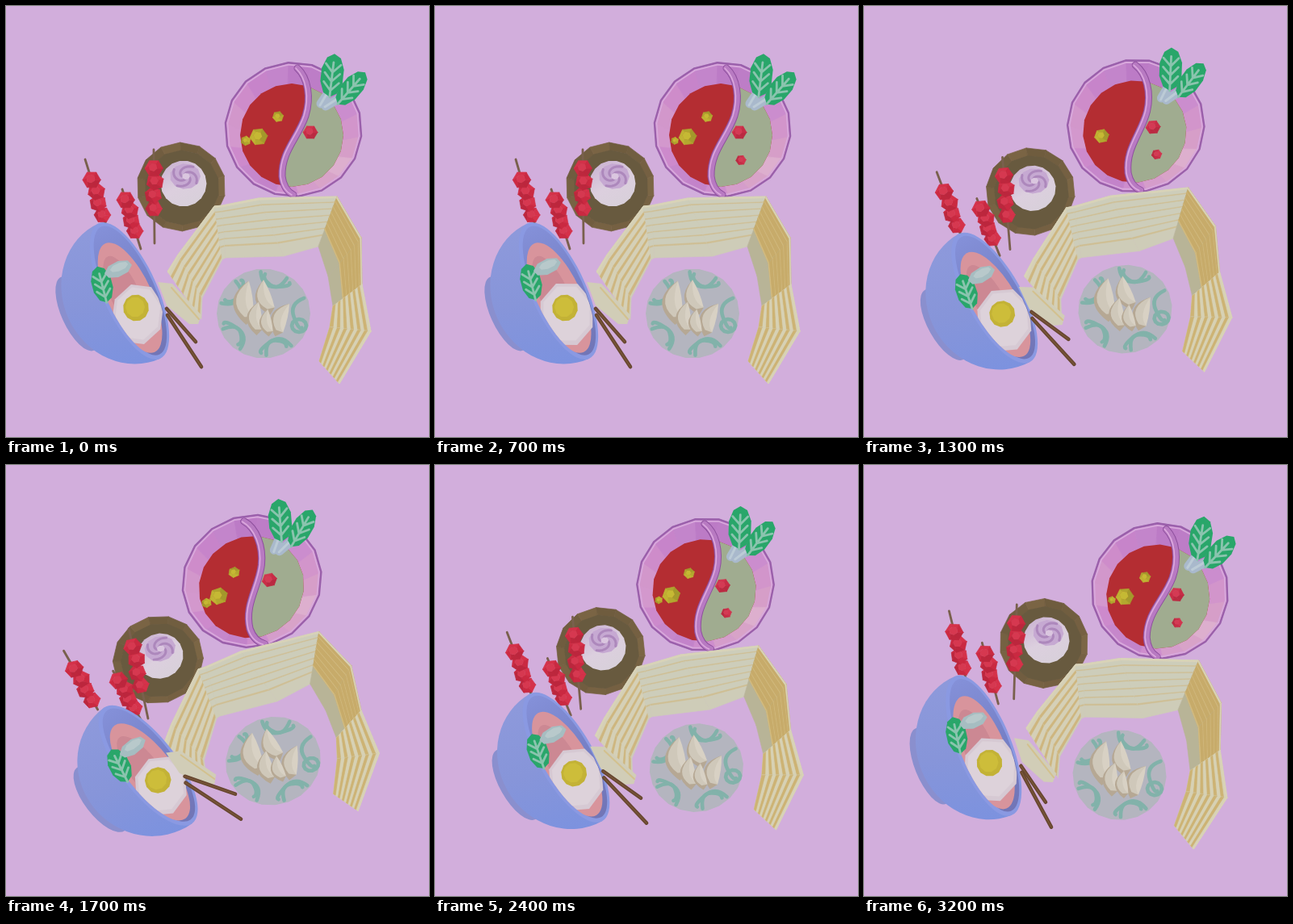
An HTML page with a canvas that plays this animation: 524x534 px, repeating every 3300 ms.

```html
<!DOCTYPE html>
<html lang="en">
<head>
<meta charset="utf-8">
<title>Street food table</title>
<style>
html, body { margin: 0; width: 100%; height: 100%; overflow: hidden; background: #d2aedc; }
canvas { display: block; width: 524px; height: 534px; }
</style>
</head>
<body>
<canvas id="stage" width="524" height="534"></canvas>
<script>
const ctx = document.getElementById('stage').getContext('2d');
const LOOP = 3300, STEP = 100, TAU = 2 * Math.PI;

const mix = (a, b, k) => a + (b - a) * k;
const clamp = v => Math.min(1, Math.max(0, v));
const ease = u => u * u * (3 - 2 * u);
const rand = seed => Math.abs(Math.sin(seed * 12.9898) * 43758.5453) % 1;
const hsl = (h, s, l) => `hsl(${h} ${s}% ${l}%)`;

// The table rests, swings round, then drifts back past its rest.
function swingAt(t) {
  if (t < 1800) return 1.03 * ease(clamp((t - 700) / 1100) ** 1.5);
  return mix(1.03, -0.2, ease(((t - 1800) / 1400) ** 0.8));
}

// Food surfaces and sinks again.
const bobAt = t => Math.min(1, 2.8 * Math.sin(Math.PI * (t % 1700) / 1700));
const floatAt = t => 1 - Math.exp(-(((t - 1300) / 150) ** 2));

function stroke(d, color, width) {
  ctx.strokeStyle = color;
  ctx.lineWidth = width;
  ctx.stroke(new Path2D(d));
}

function fill(d, color) {
  ctx.fillStyle = color;
  ctx.fill(new Path2D(d));
}

function ramp(x0, y0, x1, y1, ...colors) {
  const g = ctx.createLinearGradient(x0, y0, x1, y1);
  colors.forEach((c, i) => g.addColorStop(i / (colors.length - 1), c));
  return g;
}

function trace(points) {
  ctx.beginPath();
  points.forEach(p => ctx.lineTo(...p));
  ctx.closePath();
}

function ring(x, y, rx, ry, n, turn = 0) {
  return Array.from({ length: n }, (_, i) => {
    const a = turn + i * TAU / n;
    return [x + rx * Math.cos(a), y + ry * Math.sin(a)];
  });
}

function ngon(x, y, rx, ry, n, turn, color) {
  trace(ring(x, y, rx, ry, n, turn));
  ctx.fillStyle = color;
  ctx.fill();
}

function outline(x, y, rx, ry, n, turn, color, width) {
  trace(ring(x, y, rx, ry, n, turn));
  ctx.strokeStyle = color;
  ctx.lineWidth = width;
  ctx.stroke();
}

function oval(x, y, rx, ry, color, from = 0, to = TAU) {
  ctx.beginPath();
  ctx.ellipse(x, y, rx, ry, 0, from, to);
  ctx.fillStyle = color;
  ctx.fill();
}

// Flat panels between two rings, coloured by their angle.
function panels(outer, inner, tint) {
  const n = outer.length;
  outer.forEach((p, i) => {
    const j = (i + 1) % n;
    trace([p, outer[j], inner[j], inner[i]]);
    ctx.fillStyle = ctx.strokeStyle = tint((i + 0.5) * TAU / n, i);
    ctx.lineWidth = 0.7;
    ctx.fill();
    ctx.stroke();
  });
}

function gem(x, y, r, hue, sat, light, seed = x) {
  if (r < 0.4) return;
  const edge = ring(x, y, r, r * 0.97, 6, seed);
  const core = ring(x - r * 0.1, y - r * 0.12, r * 0.5, r * 0.48, 6, seed + 0.3);
  panels(edge, core, a => hsl(hue, sat, light - 4 * Math.sin(a + 0.6)));
  trace(core);
  ctx.fillStyle = hsl(hue, sat, light + 5);
  ctx.fill();
}

// Tilts the table by r; nearer things slide further.
function place(r, depth, lift, draw) {
  ctx.save();
  ctx.transform(1, -0.235 * r, 0.2 * r, 1 - 0.04 * r, (depth - 70) * r, 75.6 * r + lift * r * r);
  draw();
  ctx.restore();
}

function local(x, y, turn, draw) {
  ctx.save();
  ctx.translate(x, y);
  ctx.rotate(turn);
  draw();
  ctx.restore();
}

function leaf(x, y, rx, ry, turn) {
  local(x, y, turn, () => {
    ngon(0, 0, rx, ry, 10, 0.3, '#29a66a');
    let d = `M0 ${ry}V${-ry * 0.6}`;
    for (let y = ry * 0.7; y > -ry * 0.5; y -= ry * 0.42) {
      d += `M${-rx * 0.65} ${y - ry * 0.38}L0 ${y}L${rx * 0.65} ${y - ry * 0.38}`;
    }
    stroke(d, '#8ac4ae', 2.8);
  });
}

function hotPot(bob, float) {
  const x = 356, y = 153, n = 18;
  const rim = ring(x, y, 85, 83.5, n, 0.1);
  panels(rim, ring(354, 160, 62, 62, n, 0.1), (a, i) => {
    const glow = Math.max(0, Math.cos(a - 0.6)) ** 2 + 0.55 * Math.max(0, Math.cos(a - 3.2)) ** 3;
    return hsl(mix(292, 320, glow), 40, 63 + 12 * glow + 3 * rand(i));
  });
  outline(x, y, 84.5, 83, n, 0.1, '#9a60ab', 2.4);
  outline(x, y, 82, 80.5, n, 0.1, '#d8a8dc', 1.8);

  const wall = 'M361 77C374 89 378 113 371 136C362 163 341 180 342 211Q344 228 356 234';
  ctx.save();
  trace(ring(354, 160, 64, 64, 20));
  ctx.clip();
  ctx.fillStyle = '#b42d32';
  ctx.fillRect(280, 80, 150, 160);
  fill(wall + 'H440V77Z', '#a0ac90');
  ctx.restore();
  stroke(wall, '#8e509e', 9);
  stroke(wall, '#b87ac2', 7);
  ctx.save();
  ctx.translate(-2, 0);
  stroke(wall, '#dca8de', 1.6);
  ctx.restore();

  gem(337, 137, 6.8 * float, 55, 58, 44);
  gem(313, 162, mix(9, 11, float), 55, 58, 44);
  gem(297, 167, mix(6, 4.6, bob) * float, 55, 58, 44);
  gem(377, 156.5, 9, 350, 64, 48);
  gem(379, 191, 6.3 * bob, 350, 64, 48);

  stroke('M390 121L399 108M396 124L412 115', '#a9b9cc', 11);
  stroke('M389 123L399 106M395 125L412 114', '#bccbd6', 3);
  leaf(404, 86, 14.5, 27, 0.12);
  leaf(428, 102, 13, 26, 0.72);
}

function brownBowl() {
  const x = 217, y = 224, n = 14;
  panels(ring(x, y, 55, 55, n, 0.2), ring(x + 1, y + 1, 46, 46, n, 0.2),
    (a, i) => hsl(36, 28, 34 + 4 * rand(i + 3)));
  ngon(x + 1, y + 1, 46.5, 46.5, n, 0.2, '#685a3f');
  ngon(220, 220, 28.5, 28.5, 18, 0, ramp(204, 196, 232, 248, '#cdb6d4', '#dccfde', '#d8d0da'));
  ngon(222, 211, 19, 16, 11, 0, '#c6a9d2');
  for (let k = 0; k < 4; k++) {
    ctx.beginPath();
    for (let s = 0; s <= 1; s += 0.1) {
      const a = k * TAU / 4 + 2.2 * s, d = mix(4, 17, s);
      ctx.lineTo(222 + d * Math.cos(a), 211 + d * 0.85 * Math.sin(a));
    }
    ctx.strokeStyle = '#ad88bc';
    ctx.lineWidth = 3;
    ctx.stroke();
  }
  ngon(223, 211, 5, 4, 7, 0, '#dac6df');
}

function skewer(x0, y0, x1, y1, from, to) {
  stroke(`M${x0} ${y0}L${x1} ${y1}`, '#79604d', 2.8);
  for (let i = 3; i >= 0; i--) {
    const k = mix(from, to, i / 3);
    gem(mix(x0, x1, k) + 1.5 * Math.sin(i * 2), mix(y0, y1, k), 11.2 - 0.3 * i, 351, 66, 48, i * 0.7);
  }
}

const OUTER = [[200, 329], [213, 308], [258, 248], [268, 247], [313, 238],
  [410, 236], [440, 287], [441, 345], [452, 403], [413, 468]];
const INNER = [[242, 388], [243, 362], [268, 314], [272, 312], [344, 310],
  [387, 298], [399, 335], [405, 372], [401, 398], [388, 440]];
const LEG = { depth: 0.95, base: '#d5d0b7', stripe: '#ceb67f', part: 0.36 };
const TOP = { depth: 0.78, base: '#cdcdba', stripe: '#cfbe93', part: 0.16 };
const GOLD = { depth: 0.66, base: '#c7ab6a', stripe: '#d3bd84', part: 0.13 };
const TAIL = { depth: 1, base: '#d7d1b4', stripe: '#cdb374', part: 0.48 };

function noodles() {
  const at = (i, f) => [mix(OUTER[i][0], INNER[i][0], f), mix(OUTER[i][1], INNER[i][1], f)];
  const band = (i, a, b, color) => {
    trace([at(i, a), at(i + 1, a), at(i + 1, b), at(i, b)]);
    ctx.fillStyle = ctx.strokeStyle = color;
    ctx.lineWidth = 0.6;
    ctx.fill();
    ctx.stroke();
  };
  for (let i = 0; i < OUTER.length - 1; i++) {
    const look = i < 2 ? LEG : i < 5 ? TOP : i < 7 ? GOLD : TAIL;
    band(i, 0, 1, look === GOLD ? '#b8b497' : '#ceccb8');
    for (let k = 0; k < 6; k++) {
      const a = k / 6 * look.depth, b = (k + 1) / 6 * look.depth;
      band(i, a, b, look.base);
      band(i, mix(b, a, look.part), b, look.stripe);
    }
    band(i, 0, 0.03, '#d9d3b8');
  }
}

function noodleEnd() {
  trace([[188, 342], [206, 344], [242, 383], [238, 394], [227, 394], [199, 371]]);
  ctx.fillStyle = '#d1cdb7';
  ctx.fill();
  stroke('M205 349L239 388', '#d3c18e', 2);
}

function plate() {
  const x = 319, y = 381;
  ngon(x, y, 58, 55.5, 22, 0, '#b4b5bf');
  const polar = (d, a) => `${x + d * Math.cos(a)} ${y + d * 0.96 * Math.sin(a)}`;
  for (let k = 1; k < 10; k++) {
    const a = k * TAU / 10 + 0.25, bend = k % 2 ? 0.5 : -0.35;
    stroke(`M${polar(54, a)}Q${polar(34, a)} ${polar(38, a + bend)}T${polar(51, a + bend * 1.5)}`, '#82b2aa', 4.6);
  }
  outline(363, 396, 9, 8, 12, 0, '#82b2aa', 4.6);
  const dumpling = (px, py, size, turn) => local(px, py, turn, () => {
    ctx.scale(size, size);
    fill('M5 -25Q-28 2 7 27L15 17Q1 4 5 -25Z', '#b6a894');
    fill('M5 -25Q-20 0 4 18L15 17Q1 4 5 -25Z', '#cfc8ba');
    fill('M5 -25Q-2 6 15 17Q13 -6 5 -25Z', '#d8d1c4');
  });
  dumpling(293, 366, 1.05, 0.1);
  dumpling(318, 361, 0.85, -0.15);
  dumpling(307, 386, 0.8, 0.1);
  dumpling(338, 386, 0.85, 0.45);
  dumpling(321, 392, 0.65, 0);
}

function blueBowl(bob) {
  const turn = 1.143;
  const inBowl = draw => local(153, 353, turn, draw);
  inBowl(() => {
    oval(-1, 70, 50, 20, '#8a8fce');
    oval(0, 0, 92, 83, ramp(-80, 0, 85, 40, '#8d99db', '#8795d9', '#7c92df'), 0, Math.PI);
    oval(0, 0, 92, 34, '#8a99e2');
    oval(0, -1, 87, 30, ramp(-85, 0, 85, 0, '#8490d8', '#7680c6', '#7275b6'));
  });
  ctx.save();
  ctx.beginPath();
  ctx.ellipse(153, 353, 87, 30, turn, 0, TAU);
  ctx.clip();
  inBowl(() => {
    oval(8, 3, 74, 28, '#d8949c');
    oval(2, 7, 52, 18, '#cc8893');
  });
  const size = mix(0.94, 1, bob);
  local(163, 382, mix(0.12, 0, bob), () => {
    ngon(0, 0, 35 * size, 41 * size, 8, 0.4, '#d6c9d3');
    ngon(0, -1, 31 * size, 36 * size, 8, 0.4, '#ddd2da');
  });
  ngon(161, 374, 16, 16.5, 12, 0.2, '#c3b236');
  ngon(160, 373, 12, 12.5, 10, 0, '#cdbd3a');
  ctx.restore();
  leaf(119, mix(345, 342, bob), 13, 23, -0.25);
  local(139, mix(326, 323, bob), -0.4, () => {
    ngon(0, 0, 18, 9.5, 8, 0.2, '#a6bdc1');
    ngon(2, -2, 12, 5, 8, 0.2, '#b8c9cb');
  });
}

function chopstick(r, x0, y0, x1, y1) {
  const d = `M${x0 + 23 * r} ${y0 + 11 * r}L${x1 + 50 * r} ${y1 - 8.5 * r}`;
  stroke(d, '#66462f', 4.6);
  stroke(d, '#775437', 1.6);
}

function render(t) {
  const r = swingAt(t), bob = bobAt(t), float = floatAt(t);
  ctx.fillStyle = '#d2aedc';
  ctx.fillRect(0, 0, 524, 534);
  ctx.lineCap = ctx.lineJoin = 'round';

  place(r, -13, 5, () => hotPot(bob, float));
  place(r, -4, 2, brownBowl);
  place(r, 5, -4, () => skewer(98 + 2 * bob, 190, 124, 272, 0.31, 0.84));
  place(r, 13, -4, () => skewer(144, 227, 167, 301, 0.18, 0.7));
  place(r, 3, 0, () => skewer(183, 178, 184, 294, 0.2, 0.63));
  place(r, 0, 0, noodles);
  place(r, 6, 0, plate);
  place(r, 23, -6, () => blueBowl(bob));
  place(r, 12, -3, noodleEnd);
  chopstick(r, 199, 375, 235, 416);
  chopstick(r, 200, 383, 242, 447);
}

function tick(now) {
  render(Math.floor(now % LOOP / STEP) * STEP);
  requestAnimationFrame(tick);
}
render(0);
requestAnimationFrame(tick);
</script>
</body>
</html>
```
